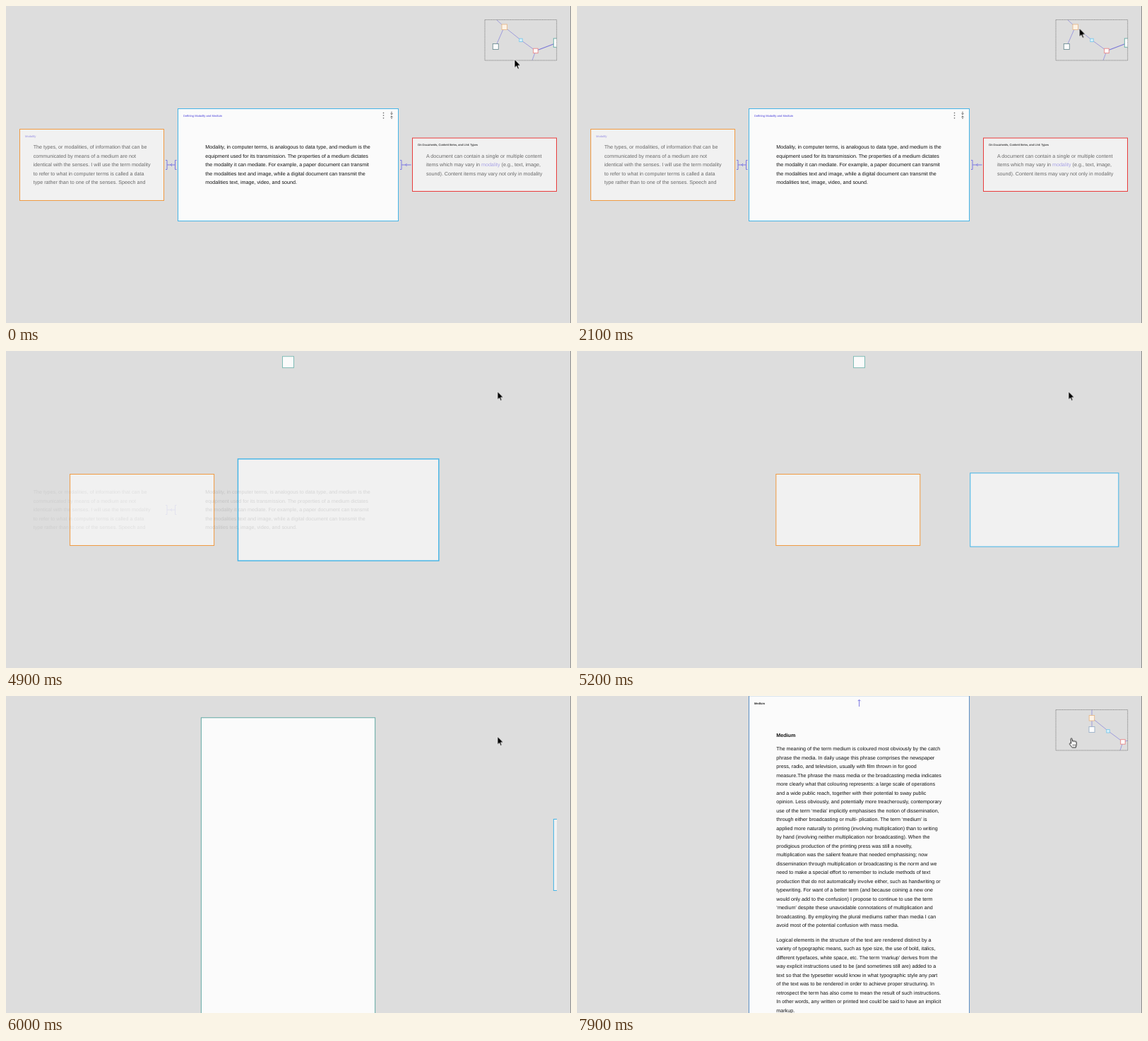
These frames come from a looping animation (800 by 449 pixels, 8.4 s). An HTML page:

```html
<!DOCTYPE html>
<html lang="en">
<head>
<meta charset="utf-8">
<title>Linked documents</title>
<style>
html, body { margin: 0; height: 100%; overflow: hidden; background: #ddd; }
svg { display: block; width: 100%; height: 100%; font-family: "Liberation Sans", Arial, sans-serif; text-rendering: geometricPrecision; }
svg * { animation-duration: 8.4s; animation-iteration-count: infinite; animation-timing-function: linear; }

.body { font-size: 7.16px; fill: #111; white-space: pre; }
.dim { fill: #686868; }
.bold { font-weight: bold; }
.head { font-size: 4.1px; fill: #3a3a3a; stroke: #3a3a3a; stroke-width: .08; }
.link { fill: #a9a3e6; stroke: #a9a3e6; }
tspan.link { stroke: none; }
.active { fill: #6f68e0; stroke: #6f68e0; }
.card { fill: #f1f1f1; }
.wide { fill: #fbfbfb; }
.orange { stroke: #f09a42; }
.blue { stroke: #45b4e6; }
.red { stroke: #e93c3c; }
.teal { stroke: #63aaa4; }
.line { fill: none; stroke: #7d79e2; }
.edge { fill: none; stroke: #9895dc; stroke-width: .9; }
.node { fill: #fcfcfc; stroke-width: .9; }
.icon { fill: none; stroke: #555; stroke-width: .8; }
.frame { fill: none; stroke: #777; stroke-width: .9; stroke-dasharray: 1 .8; }

/* First view, cleared when the link is followed */
#shells { animation-name: clear; }
#copy { animation-name: fade; }
@keyframes clear { 0%, 57% { opacity: 1 } 57.01%, 100% { opacity: 0 } }
@keyframes fade { 0%, 57% { opacity: 1 } 57.01% { opacity: .16 } 58.4% { opacity: .12 } 60%, 100% { opacity: 0 } }

/* Cards in transit */
#movers { animation-name: transit; }
@keyframes transit { 0%, 57% { opacity: 0 } 57.01%, 100% { opacity: 1 } }
#fromCentre { animation-name: toRight; }
@keyframes toRight {
  0%, 57.1% { x: 243.5px; y: 145.5px; width: 312px; height: 159px; stroke-width: 1.6; animation-timing-function: ease }
  63.92% { x: 575.5px; y: 174.5px; width: 204px; height: 101px; stroke-width: 1; animation-timing-function: ease }
  73.45%, 100% { x: 781px; y: 174.5px; width: 204px; height: 101px; stroke-width: 1 }
}
#fromLeft { animation-name: toBottom; }
@keyframes toBottom {
  0%, 57.1% { x: 19.5px; y: 174.5px; width: 204px; height: 101px; stroke-width: 1; animation-timing-function: ease }
  63.92% { x: 297.5px; y: 174.5px; width: 204px; height: 101px; stroke-width: 1; animation-timing-function: ease }
  73.45%, 100% { x: 391.5px; y: 471.5px; width: 16px; height: 16px; stroke-width: 2.6 }
}
#sheet { animation-name: drop, grow, tint; }
@keyframes drop {
  0%, 63.92% { y: 7.7px; animation-timing-function: ease-out }
  66.6%, 66.9% { y: 139.5px; animation-timing-function: ease }
  76.43%, 100% { y: -.3px }
}
@keyframes grow {
  0%, 66.9% { x: 391.5px; width: 16px; height: 16px; animation-timing-function: ease }
  76.43%, 100% { x: 243.5px; width: 312px; height: 900px }
}
@keyframes tint { 0%, 66.9% { stroke: #80bcb6 } 70%, 76.4% { stroke: #63aaa4 } 78.5%, 100% { stroke: #5b8fc4 } }

/* Second view */
#page { animation-name: reveal; }
#map2 { animation-name: arrive; }
@keyframes reveal { 0%, 78% { opacity: 0 } 81.5%, 100% { opacity: 1 } }
@keyframes arrive { 0%, 78.5% { opacity: 0 } 78.51%, 100% { opacity: 1 } }

/* Pointer */
#pointer { animation-name: wander; }
@keyframes wander {
  0%, 1.2% { transform: translate(720px, 75.5px); animation-timing-function: ease-in-out }
  10.7% { transform: translate(731px, 51px); animation-timing-function: ease-in-out }
  21.4% { transform: translate(728px, 41px); animation-timing-function: ease-in-out }
  25%, 32.5% { transform: translate(711.3px, 31.5px); animation-timing-function: ease-in-out }
  41.7%, 100% { transform: translate(696px, 57.4px) }
}
#arrow { animation-name: arrow; }
#hand { animation-name: hand; }
@keyframes arrow {
  0%, 39.3% { opacity: 1; transform: scale(1) }
  39.31%, 57% { opacity: 0; transform: scale(.94) }
  57.01%, 78.5% { opacity: 1; transform: scale(.94) }
  78.51%, 100% { opacity: 0; transform: scale(.94) }
}
@keyframes hand {
  0%, 39.3% { opacity: 0 }
  39.31%, 57% { opacity: 1 }
  57.01%, 78.5% { opacity: 0 }
  78.51%, 100% { opacity: 1 }
}
</style>
</head>
<body>
<svg viewBox="0 0 800 449">
  <defs>
    <clipPath id="stage"><rect x="0" y="-10" width="780" height="480"/></clipPath>
    <clipPath id="mapClip"><rect x="678" y="19.5" width="102" height="57.5"/></clipPath>
  </defs>
  <rect width="800" height="449" fill="#ddd"/>

  <g id="shells">
    <rect class="card orange" x="19.5" y="174.5" width="204" height="101"/>
    <rect class="wide blue" x="243.5" y="145.5" width="312" height="159"/>
    <rect class="card red" x="575.5" y="187" width="204" height="75.5"/>
    <text class="head link" x="27" y="185.6">Modality</text>
    <text class="head active" x="251" y="156.8">Defining Modality and Medium</text>
    <text class="head" x="583" y="198.2">On Documents, Content Items, and Link Types</text>
    <g fill="#555">
      <circle cx="534.5" cy="151.5" r=".8"/><circle cx="534.5" cy="155" r=".8"/><circle cx="534.5" cy="158.7" r=".8"/>
    </g>
    <path class="icon" d="M546 149.5v4.2m-1.6-1.6 1.6 1.6 1.6-1.6M546 160v-4.2m-1.6 1.6 1.6-1.6 1.6 1.6"/>
    <path class="line" d="M558 218.5h2v13h-2M560 225h13.5M567.5 223l-2 2 2 2"/>
    <g clip-path="url(#mapClip)">
      <path class="edge" d="M694 19 705.5 29.5 693.3 57.5M705.5 29.5 729 48.3 750 63.5 745 77"/>
      <path class="edge" style="stroke:#7a77d6;stroke-width:1.2" d="M750 63.5 779 52.5"/>
      <rect class="node orange" style="fill:#fdf3e6;stroke:#e6b98a" x="702" y="26" width="7.5" height="7.5"/>
      <rect class="node" stroke="#6f8f94" x="689.3" y="53.5" width="8" height="8"/>
      <rect class="node blue" style="fill:#d9f1fb;stroke:#7cc8ea" x="726.8" y="46.2" width="4.4" height="4.4"/>
      <rect class="node red" style="stroke:#e98484" x="746.7" y="60.2" width="6.5" height="6.5"/>
      <rect class="node teal" x="775.3" y="46" width="10" height="12.3"/>
    </g>
    <rect class="frame" x="678" y="19.5" width="101.7" height="57.5"/>
  </g>

  <g id="movers" clip-path="url(#stage)">
    <rect id="fromCentre" class="card blue"/>
    <rect id="fromLeft" class="card orange"/>
    <rect id="sheet" class="wide teal"/>
  </g>

  <g id="copy">
    <path class="line" d="M226 218.5h2v13h-2M241.5 218.5h-2v13h2M228 225h11.5M235 223l-2 2 2 2"/>
  </g>

  <g id="page">
    <text class="head bold" x="251" y="11.6" style="font-size:4px">Medium</text>
    <path class="line" d="M399.6 15V5.2M397.6 7.2l2-2 2 2"/>
    <text class="body bold" x="282.3" y="57.6">Medium</text>
  </g>

  <g id="map2">
    <g clip-path="url(#mapClip)">
      <path class="edge" d="M729 19V47.5M729 31 752 49.5 773 65 769 77M773 65 780 63"/>
      <rect class="node orange" style="fill:#fdf3e6;stroke:#e6b98a" x="725.2" y="27.5" width="7.5" height="7.5"/>
      <rect class="node" stroke="#9ab0c8" x="725" y="43.5" width="8" height="8"/>
      <rect class="node blue" style="fill:#d9f1fb;stroke:#7cc8ea" x="749.8" y="47.6" width="4.4" height="4.4"/>
      <rect class="node red" style="stroke:#e98484" x="769.7" y="61.7" width="6.5" height="6.5"/>
    </g>
    <rect class="frame" x="678" y="19.5" width="101.7" height="57.5"/>
  </g>

  <path d="M799.5 0V449" stroke="#8c8c8c"/>

  <g id="pointer">
    <path id="arrow" d="M0 0V12.2L2.8 9.6 4.7 14 6.6 13.2 4.8 8.9H8.7Z" fill="#000" stroke="#fff" stroke-width=".8"/>
    <g id="hand" fill="#fff" stroke="#111" stroke-width=".9" stroke-linejoin="round">
      <path d="M3.7 10 3.1 3.6a1 1 0 0 1 2 0L5.6 7a.95.95 0 0 1 1.9.2 .95.95 0 0 1 1.9.3 .95.95 0 0 1 1.8.5V12L10.2 15.6H5.2L1.5 10.9a1 1 0 0 1 1.5-1.3Z"/>
      <path d="M6.1 11v2.4M7.8 11v2.4M9.4 11v2.4" stroke-width=".6"/>
    </g>
  </g>
</svg>
<script>
const NS = 'http://www.w3.org/2000/svg';
const LEADING = 12.5;

function paragraph(parent, x, y, text, cls = '') {
  text.trim().split('\n').forEach((row, i) => {
    const el = document.createElementNS(NS, 'text');
    el.setAttribute('class', 'body ' + cls);
    el.setAttribute('x', x);
    el.setAttribute('y', y + i * LEADING);
    el.innerHTML = row;
    document.getElementById(parent).append(el);
  });
}

paragraph('copy', 38.7, 202.4, `
The types, or modalities, of information that can be
communicated by means of a medium are not
identical with the senses. I will use the term modality
to refer to what in computer terms is called a data
type rather than to one of the senses. Speech and`, 'dim');

paragraph('copy', 282.3, 202.4, `
Modality, in computer terms, is analogous to data type, and medium is the
equipment used for its transmission. The properties of a medium dictates
the modality it can mediate. For example, a paper document can transmit
the modalities text and image, while a digital document can transmit the
modalities text, image, video, and sound.`);

paragraph('shells', 595, 214.9, `
A document can contain a single or multiple content
items which may vary in <tspan class="link">modality</tspan> (e.g., text, image,
sound). Content items may vary not only in modality`, 'dim');

paragraph('page', 282.3, 77.4, `
The meaning of the term medium is coloured most obviously by the catch
phrase the media. In daily usage this phrase comprises the newspaper
press, radio, and television, usually with film thrown in for good
measure.The phrase the mass media or the broadcasting media indicates
more clearly what that colouring represents: a large scale of operations
and a wide public reach, together with their potential to sway public
opinion. Less obviously, and potentially more treacherously, contemporary
use of the term ‘media’ implicitly emphasises the notion of dissemination,
through either broadcasting or multi- plication. The term ‘medium’ is
applied more naturally to printing (involving multiplication) than to writing
by hand (involving neither multiplication nor broadcasting). When the
prodigious production of the printing press was still a novelty,
multiplication was the salient feature that needed emphasising; now
dissemination through multiplication or broadcasting is the norm and we
need to make a special effort to remember to include methods of text
production that do not automatically involve either, such as handwriting or
typewriting. For want of a better term (and because coining a new one
would only add to the confusion) I propose to continue to use the term
‘medium’ despite these unavoidable connotations of multiplication and
broadcasting. By employing the plural mediums rather than media I can
avoid most of the potential confusion with mass media.`);

paragraph('page', 282.3, 347.6, `
Logical elements in the structure of the text are rendered distinct by a
variety of typographic means, such as type size, the use of bold, italics,
different typefaces, white space, etc. The term ‘markup’ derives from the
way explicit instructions used to be (and sometimes still are) added to a
text so that the typesetter would know in what typographic style any part
of the text was to be rendered in order to achieve proper structuring. In
retrospect the term has also come to mean the result of such instructions.
In other words, any written or printed text could be said to have an implicit
markup.`);
</script>
</body>
</html>
```
